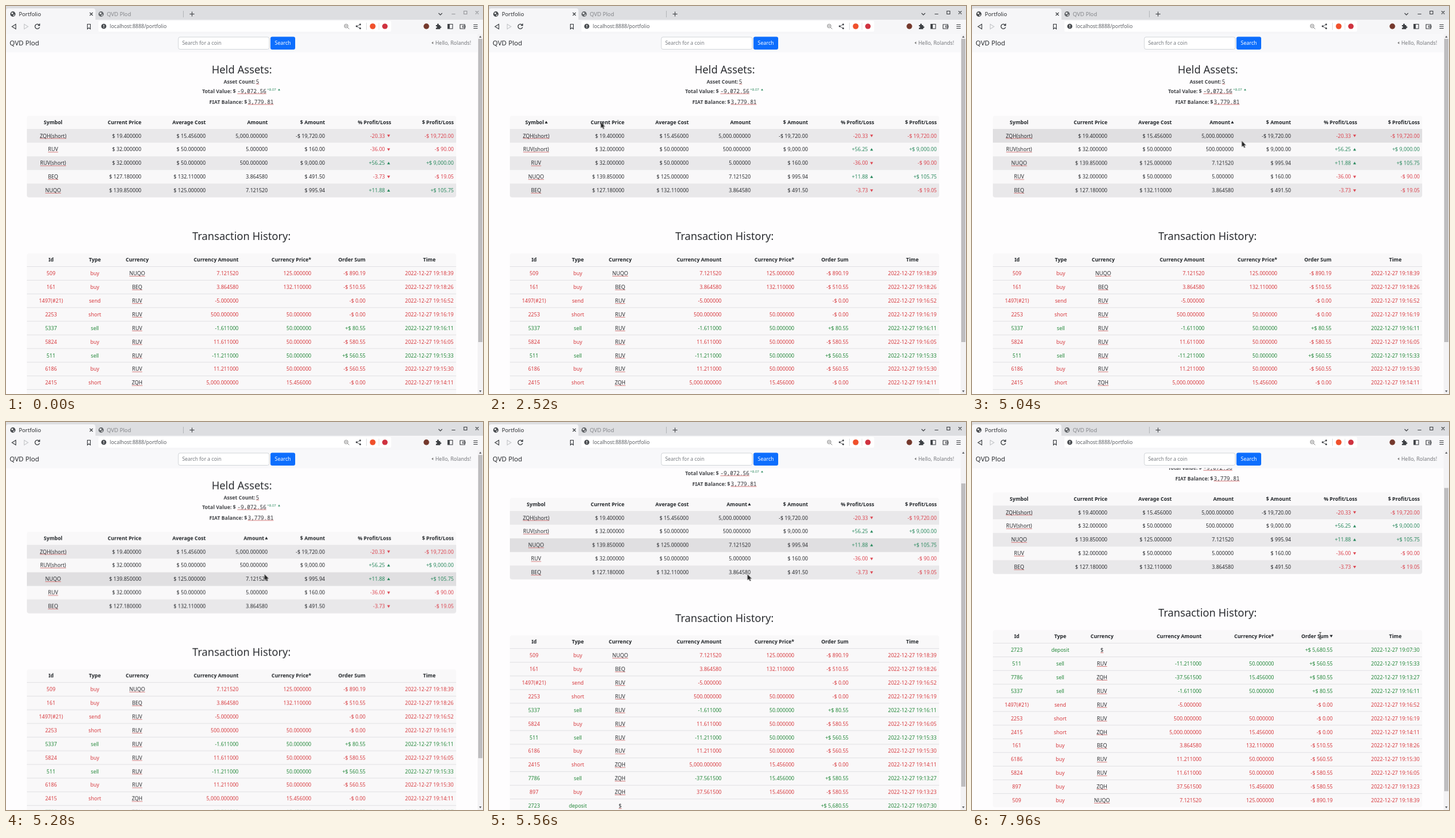
Recreate the animation shown at these times as an HTML page. Size 800 by 650 pixels, loop 8000 ms.

```html
<!DOCTYPE html>
<html lang="en">
<head>
<meta charset="utf-8">
<title>Portfolio</title>
<style>
  html, body { margin: 0; width: 100%; height: 100%; overflow: hidden; background: #fefdfe; }
  svg { display: block; width: 800px; height: 650px; font: 8.65px "Noto Sans", "Open Sans", sans-serif; fill: #2b2d31; }
  text { white-space: pre; }
  .b { font-weight: 700; font-size: 8.55px; fill: #212529; }
  .s { font-weight: 600; font-size: 8.5px; fill: #404246; }
  .h { font-weight: 500; font-size: 17.7px; }
  .u { text-decoration: underline; fill: #cf6a6a; }
  .u tspan { fill: #2b2d31; }
  .m { font-family: "Noto Sans Mono", "DejaVu Sans Mono", monospace; font-size: 9px; }
  .line { fill: none; stroke: #3c3f43; stroke-width: 1.1; }
</style>
</head>
<body>
<svg id="stage" viewBox="0 0 800 650"></svg>
<script>
const LOOP = 8000, PITCH = 22.9;
const FOCUS = 1000, SYM_UP = 2260, AMT = 3160, AMT_UP = 4240, SUM = 6800;
let css = '';

// Keyframes from [ms, value] pairs; the last value is held to the end.
function keys(name, prop, list, ease = 'step-end') {
  const last = list[list.length - 1][1];
  const frames = [...list, [LOOP, last]]
    .map(([t, v, e]) => `${t / LOOP * 100}%{${prop}:${v};${e ? `animation-timing-function:${e}` : ''}}`);
  css += `@keyframes ${name}{${frames.join('')}}.${name}{animation:${name} ${LOOP}ms ${ease} infinite}`;
}
const move = (name, list, ease) =>
  keys(name, 'transform', list.map(([t, x, y, e]) => [t, `translate(${x}px,${y}px)`, e]), ease);
const show = (name, from, to = LOOP) =>
  keys(name, 'opacity', to < LOOP ? [[0, 0], [from, 1], [to, 0]] : [[0, 0], [from, 1]]);
const hide = (name, from, to = LOOP) =>
  keys(name, 'opacity', to < LOOP ? [[0, 1], [from, 0], [to, 1]] : [[0, 1], [from, 0]]);

const text = (x, y, s, anchor = 'start', cls = '', attrs = '') =>
  `<text x="${x}" y="${y}" text-anchor="${anchor}" class="${cls}" ${attrs}>${s}</text>`;
const linked = (x, y, s, anchor, cls = '') =>
  text(x, y, `<tspan>${s}</tspan>`, anchor, 'u ' + cls);
const rect = (x, y, w, h, fill, attrs = '') =>
  `<rect x="${x}" y="${y}" width="${w}" height="${h}" fill="${fill}" ${attrs}/>`;
const dot = (x, y, r, fill) => `<circle cx="${x}" cy="${y}" r="${r}" fill="${fill}"/>`;
const line = (d, attrs = '') => `<path class="line" d="${d}" ${attrs}/>`;
const tri = (x, y, up, fill = '#212529', cls = '', w = 5) => {
  const k = up ? -1 : 1;
  return `<path class="${cls}" fill="${fill}" d="M${x - w / 2} ${y - k * w * .4}h${w}l${-w / 2} ${k * w * .85}z"/>`;
};
const group = (cls, body) => `<g class="${cls}">${body}</g>`;

// Rows change slots each time a header is clicked.
const rowKeys = (name, row, orders) =>
  move(name, orders.map(([t, order]) => [t, 0, order.indexOf(row) * PITCH]));

const RED = '#dc4550', GREEN = '#2b8a5f';
const assets = `ZQH(short)|$ 19.400000|$ 15.456000|5,000.000000|-$ 19,720.00|-20.33|-$ 19,720.00
RUV|$ 32.000000|$ 50.000000|5.000000|$ 160.00|-36.00|-$ 90.00
RUV(short)|$ 32.000000|$ 50.000000|500.000000|$ 9,000.00|+56.25|+$ 9,000.00
BEQ|$ 127.180000|$ 132.110000|3.864580|$ 491.50|-3.73|-$ 19.05
NUQO|$ 139.850000|$ 125.000000|7.121520|$ 995.94|+11.88|+$ 105.75`;
const assetOrders = [
  [0, [0, 1, 2, 3, 4]], [FOCUS, [3, 4, 1, 2, 0]], [SYM_UP, [0, 2, 1, 4, 3]],
  [AMT, [3, 1, 4, 2, 0]], [AMT_UP, [0, 2, 4, 1, 3]]
];

const trades = `509|buy|NUQO|7.121520|125.000000|-$ 890.19|18:39
161|buy|BEQ|3.864580|132.110000|-$ 510.55|18:26
1497(#21)|send|RUV|-5.000000||-$ 0.00|16:52
2253|short|RUV|500.000000|50.000000|-$ 0.00|16:19
5337|sell|RUV|-1.611000|50.000000|+$ 80.55|16:11
5824|buy|RUV|11.611000|50.000000|-$ 580.55|16:05
511|sell|RUV|-11.211000|50.000000|+$ 560.55|15:33
6186|buy|RUV|11.211000|50.000000|-$ 560.55|15:30
2415|short|ZQH|5,000.000000|15.456000|-$ 0.00|14:11
7786|sell|ZQH|-37.561500|15.456000|+$ 580.55|13:27
897|buy|ZQH|37.561500|15.456000|-$ 580.55|13:23
2723|deposit|$|||+$ 5,680.55|07:30`;
const tradeOrders = [
  [0, [0, 1, 2, 3, 4, 5, 6, 7, 8, 9, 10, 11]],
  [SUM, [11, 6, 9, 4, 2, 3, 8, 1, 7, 5, 10, 0]]
];

const parse = s => s.split('\n').map(r => r.split('|'));

function summary() {
  return text(395.5, 112.5, 'Held Assets:', 'middle', 'h')
    + text(365, 129.5, 'Asset Count:', 'start', 's') + linked(419.5, 129.5, '5')
    + text(329, 145.5, 'Total Value: $', 'start', 's') + linked(388, 145.5, '-9,072.56', 'start', 'm')
    + text(438, 142, '+8.07', 'start', '', `style="font-size:5.8px;fill:${GREEN}"`)
    + tri(458, 140, true, GREEN, '', 3.6)
    + text(341, 163.5, 'FIAT Balance: $', 'start', 's') + linked(405.5, 163.5, '3,779.81', 'start', 'm');
}

function assetTable() {
  const top = 206, ends = [79, 227, 335, 439, 535, 646, 751];
  let out = rect(35, 184, 720, 137, '#f9f8f9', 'rx="4"');
  for (let i = 0; i < 4; i += 2) out += rect(35, top + i * PITCH, 720, PITCH, '#e9e8ea');
  out += `<path fill="#e9e8ea" d="M35 ${top + 4 * PITCH}h720v19q0 4-4 4h-712q-4 0-4-4z"/>`;
  out += rect(35, top, 720, PITCH, '#000', 'opacity=".035" class="hover"');

  const heads = ['Symbol', 'Current Price', 'Average Cost', 'Amount', '$ Amount', '% Profit/Loss', '$ Profit/Loss'];
  const off = { 0: 'symOff', 3: 'amtOff' };
  heads.forEach((s, i) => out += text(ends[i], 198, s, i ? 'end' : 'middle', 'b ' + (off[i] || '')));
  out += group('symOn', text(92, 198, 'Symbol', 'end', 'b')
    + tri(96, 194.8, false, '#212529', 'symDown') + tri(96, 194.8, true, '#212529', 'symUp'));
  out += group('amtOn', text(433, 198, 'Amount', 'end', 'b')
    + tri(436.7, 194.8, false, '#212529', 'amtDown') + tri(436.7, 194.8, true, '#212529', 'amtUp'));

  parse(assets).forEach((cells, r) => {
    const y = 220.5, up = cells[5][0] === '+', color = up ? GREEN : RED;
    rowKeys('asset' + r, r, assetOrders);
    out += group('asset' + r, cells.map((s, i) =>
      i === 0 ? linked(79, y, s, 'middle')
        : text(i === 5 ? 635.5 : ends[i], y, s, 'end', '', i > 4 ? `fill="${color}"` : '')
    ).join('') + tri(641.7, 217.5, up, color));
  });
  return out;
}

function tradeTable() {
  const xs = [75.5, 149, 220, 390, 512, 603, 710], shift = [-.5, -1, -2, -5, -5.5, 2, 0];
  const anchor = i => i > 2 && i < 6 ? 'end' : 'middle';
  shift.forEach((dx, i) => move('col' + i, [[0, 0, 0], [SUM, dx, 0]]));

  let out = text(395, 391.5, 'Transaction History:', 'middle', 'h')
    + rect(35, 414.5, 720, 297, '#f9f8f9', 'rx="4"');
  for (let i = 0; i < 12; i++) out += rect(35, 436 + i * PITCH, 720, 1, '#e2e1e4');

  ['Id', 'Type', 'Currency', 'Currency Amount', 'Currency Price*', 'Order Sum', 'Time'].forEach((s, i) =>
    out += text(xs[i], 428, s, anchor(i), 'b ' + (i === 5 ? 'sumOff' : 'col' + i)));
  out += group('sumOn', text(598, 428, 'Order Sum', 'end', 'b') + tri(602.5, 424.8, false));

  parse(trades).forEach((cells, r) => {
    const y = 451.2, color = cells[5][0] === '+' ? '#23883a' : '#d73a3f';
    cells[6] = '2022-12-27 19:' + cells[6];
    rowKeys('trade' + r, r, tradeOrders);
    out += group('trade' + r, cells.map((s, i) =>
      i === 2 ? linked(xs[i], y, s, 'middle', 'col2')
        : text(xs[i], y, s, anchor(i), 'col' + i, `fill="${color}"`)
    ).join(''));
  });
  return out;
}

const globe = (x, y, c) => dot(x, y, 4.4, c)
  + `<path d="M${x - 2.8} ${y - 1.5}q2-2 3.2-.8t-.6 2.2q-1.6 1-2.6-1.4zm3.2 3.6q1-2 2.6-1.2-.6 2-2.2 2.4z" fill="#eee"/>`;

function browser() {
  const tabs = rect(0, 0, 800, 47, '#dddee1')
    + '<path d="M0 24V8q0-4 4-4H146q4 0 4 4V24z" fill="#f6f6f8"/>'
    + rect(0, 23, 800, 24, '#f6f6f8')
    + globe(11.5, 13.5, '#4a4d51') + text(21.5, 16.5, 'Portfolio', 'start', '', 'style="font-size:9.2px"')
    + line('M140.5 11l5 5m0-5l-5 5')
    + globe(159.5, 13.5, '#64676b') + text(169, 16.5, 'QVD Plod', 'start', '', 'style="font-size:9.2px" fill="#85878b"')
    + rect(297, 8, 1, 11, '#b4b6ba')
    + line('M308 13.5h8m-4-4v8') + line('M725.5 12l3 3 3-3')
    + group('focus', line('M747.5 13.5h6M768 8.5h5v5h-5zM787.5 8.5l5 5m0-5l-5 5'));

  const bar = rect(155, 25, 491, 18, '#fff', 'rx="2"')
    + line('M16.5 30.5v8l-6.5-4z') + line('M30.5 30.5v8l6.5-4z', 'style="stroke:#c6c8cb"')
    + line('M55.7 32a3.9 3.9 0 1 0 .6 3.3M56.5 29.5v3h-3', 'style="stroke-width:1.3"')
    + line('M136.5 30.5h5v8l-2.5-2-2.5 2z')
    + dot(164, 34, 4.3, '#4a4d51') + rect(163.4, 31.5, 1.2, 3, '#fff') + rect(163.4, 35.3, 1.2, 1.2, '#fff')
    + text(174, 37, 'localhost:8888/portfolio', 'start', '', 'style="font-size:8.5px" fill="#5c5f64"')
    + line('M573.2 36.2l2.3 2.3M573.5 33.5a3 3 0 1 1-6 0a3 3 0 1 1 6 0M569 33.5h3', 'style="stroke:#666;stroke-width:.9"')
    + line('M594 31l-6 3 6 3.5', 'style="stroke-width:.8"')
    + dot(594, 31, 1.4, '#3c3f43') + dot(588, 34, 1.4, '#3c3f43') + dot(594, 37.5, 1.4, '#3c3f43')
    + rect(604, 28, 1, 12, '#dadbdd') + rect(625, 28, 1, 12, '#e5e5e7')
    + dot(615, 34, 4.8, '#f0502b') + dot(635.5, 34, 4.6, '#cf3340')
    + dot(705, 34, 4.7, '#74382c')
    + '<path d="M721 32h2.2q-.6-2.5 1.3-2.5t1.3 2.5h2.4v2.3q2-.5 2 1.1t-2 1.2v2.2h-7.2v-2.3q2 .2 2-1.2t-2-1.2z" fill="#3c3f43"/>'
    + line('M741 30.5h8v7.5h-8z') + rect(741, 30.5, 3.2, 7.5, '#3c3f43')
    + line('M761.5 31h8v7h-8zM766 33.2h4v2.6h-4z')
    + line('M784 31.5h7m-7 3h7m-7 3h7');
  return tabs + bar;
}

function nav() {
  return rect(0, 46.5, 791, 31, '#f8f8fa')
    + text(6, 66.3, 'QVD Plod', 'start', '', 'style="font-size:11.2px"')
    + rect(289, 52, 152.5, 20.5, '#fff', 'rx="3" stroke="#d3d6da"')
    + text(295.5, 65, 'Search for a coin', 'start', '', 'style="font-size:8.4px" fill="#777b80"')
    + rect(443.5, 51.5, 41.5, 21.5, '#0d6efd', 'rx="3"')
    + text(464.3, 65, 'Search', 'middle', '', 'style="font-size:8.5px" fill="#fff"')
    + '<path d="M716.5 59.5v4.4l-2.8-2.2z" fill="#777"/>'
    + text(780, 65, 'Hello, Rolands!', 'end', '', 'style="font-size:8.6px" fill="#75777b"');
}

const scrollbar = () => rect(791, 47, 9, 603, '#f3f2f4')
  + tri(795.5, 51.5, true, '#5b5d60', '', 4) + tri(795.5, 645.5, false, '#5b5d60', '', 4)
  + rect(792, 55, 7, 508, '#bebdbf', 'class="thumb"');

const pointer = () => group('pointer',
  '<path class="arrow" d="M0 0v10l2.3-2 1.7 3.6 1.7-.8-1.7-3.4h3z" fill="#222" stroke="#aaa" stroke-width=".6"/>'
  + group('beam', line('M-2-5.5h1.3L0-4.8l.7-.7H2M0-5v10M-2 5.5h1.3L0 4.8l.7.7H2', 'style="stroke:#555"')));

show('symOn', FOCUS, AMT);
hide('symOff', FOCUS, AMT);
show('symDown', FOCUS, SYM_UP);
show('symUp', SYM_UP, AMT);
show('amtOn', AMT, SUM);
hide('amtOff', AMT, SUM);
show('amtDown', AMT, AMT_UP);
show('amtUp', AMT_UP, SUM);
show('sumOn', SUM);
hide('sumOff', SUM);
keys('focus', 'opacity', [[0, .45], [FOCUS, 1]]);

const OUT = -30;
move('hover', [[0, OUT], [132, 3], [259, 2], [424, 1], [589, 0], [754, OUT],
  [4630, 0], [5100, 1], [5260, 2], [5720, OUT]].map(([t, slot]) => [t, 0, slot * PITCH]));
move('scroll', [[0, 0, 0], [5280, 0, 0], [5440, 0, -37, 'ease-out'], [5680, 0, -66]], 'linear');
move('thumb', [[0, 0, 0], [5280, 0, 0], [5440, 0, 31, 'ease-out'], [5680, 0, 55.5]], 'linear');
move('pointer', [[0, 806, 300], [80, 806, 300], [840, 64, 194], [2280, 64, 194],
  [3000, 433, 195.5], [4400, 433, 195.5], [5040, 452.5, 226], [5080, 452.5, 226],
  [5280, 433.5, 255], [5800, 433.5, 255, 'ease-in-out'], [6440, 584, 358]], 'linear');
const beamAt = [[0, 0], [840, 1], [2300, 0], [2960, 1], [4560, 0], [6380, 1]];
keys('beam', 'opacity', beamAt);
keys('arrow', 'opacity', beamAt.map(([t, v]) => [t, 1 - v]));

const scene = rect(0, 0, 800, 650, '#fefdfe')
  + group('scroll', summary() + assetTable() + tradeTable())
  + browser() + nav() + scrollbar() + pointer();
document.head.appendChild(document.createElement('style')).textContent = css;
document.getElementById('stage').innerHTML = scene;
</script>
</body>
</html>
```
